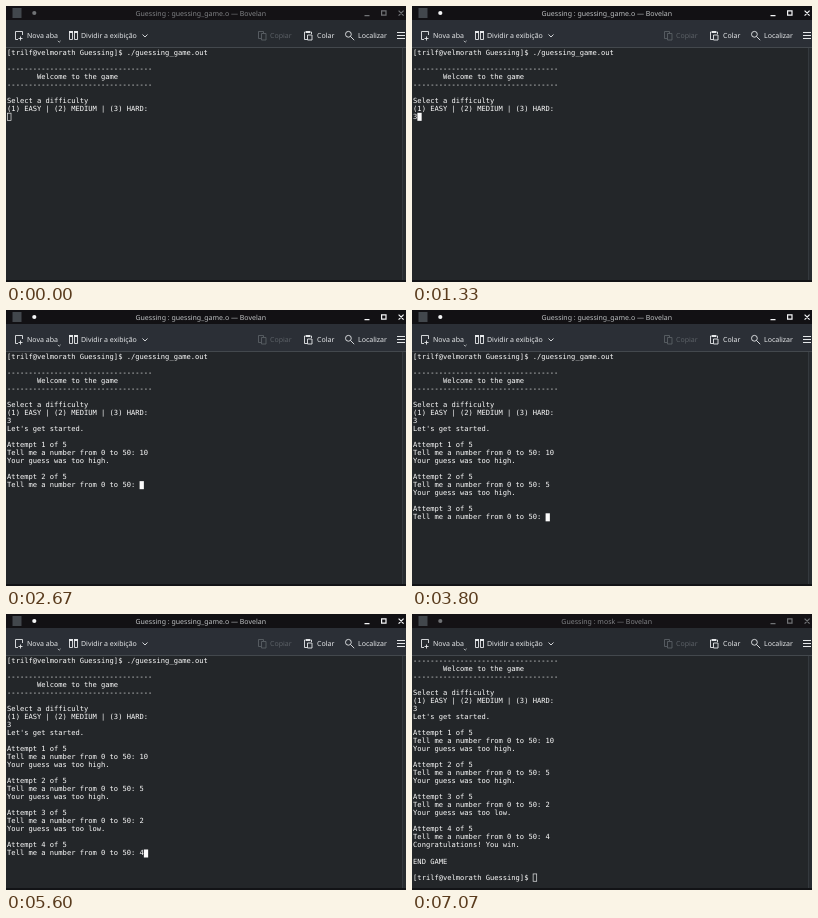
An HTML page with a canvas for the animation above (7.14 s loop, 400 px wide and 276 px high).

```html
<!DOCTYPE html>
<html lang="pt">
<head>
<meta charset="utf-8">
<title>Guessing</title>
<style>
  html, body { margin: 0; width: 100%; height: 100%; overflow: hidden; background: #232629; }
  canvas { display: block; }
</style>
</head>
<body>
<canvas id="stage" width="400" height="276"></canvas>
<script>
const ctx = document.getElementById('stage').getContext('2d');
const LOOP = 7140;
const UI = '7px "Noto Sans", "Open Sans", sans-serif';
const MONO = '7.1px "DejaVu Sans Mono", monospace';
const CELL = 4.274, ROW = 8.04, LEFT = 1.1, TOP = 42.2, ROWS = 28;
const APP = 'Bovelan', PROMPT = '[trilf@velmorath Guessing]$ ';
const RULE = '-'.repeat(34);

const ask = n => `\nAttempt ${n} of 5\nTell me a number from 0 to 50: `;

// Terminal output: [time, text appended]
const output = [
  [0, `${PROMPT}./guessing_game.out\n\n${RULE}\n       Welcome to the game\n${RULE}\n\n` +
      'Select a difficulty\n(1) EASY | (2) MEDIUM | (3) HARD:\n'],
  [1000, '3'],
  [1400, `\nLet's get started.\n${ask(1)}`],
  [2400, '1'],
  [2470, '0'],
  [2670, `\nYour guess was too high.\n${ask(2)}`],
  [3530, '5'],
  [3800, `\nYour guess was too high.\n${ask(3)}`],
  [4530, '2'],
  [4670, `\nYour guess was too low.\n${ask(4)}`],
  [5600, '4'],
  [5730, `\nCongratulations! You win.\n\nEND GAME\n\n${PROMPT}`]
];

const clamp = x => Math.max(0, Math.min(1, x));
const mix = (a, b, k) => `rgb(${a.map((v, i) => Math.round(v + (b[i] - v) * k))})`;

function rect(x, y, w, h, color) {
  ctx.fillStyle = color;
  ctx.fillRect(x, y, w, h);
}

function text(str, x, y, color, font = UI, align = 'left') {
  ctx.font = font;
  ctx.textAlign = align;
  ctx.fillStyle = color;
  ctx.fillText(str, x, y);
}

function stroke(path, color, width = 0.9) {
  ctx.strokeStyle = color;
  ctx.lineWidth = width;
  ctx.stroke(new Path2D(path));
}

function titleBar(t, focus) {
  const ink = mix([112, 114, 117], [245, 246, 247], focus);
  rect(0, 0, 400, 14, mix([20, 18, 21], [18, 17, 20], focus));
  rect(6.5, 2, 9, 10, '#42474c');
  ctx.fillStyle = ink;
  ctx.beginPath();
  ctx.arc(28.3, 7, 2.1, 0, 7);
  ctx.fill();
  const job = t < 5800 ? 'guessing_game.o' : 'mosk';
  text(`Guessing : ${job} — ${APP}`, 194.7, 9.5,
    mix([128, 130, 133], [190, 192, 194], focus), UI, 'center');
  stroke('M358.5 9.6H363.5M375.6 4.8h4.4v4.4h-4.4zM392.6 4.6l5 5m0-5l-5 5', ink, 1.2);
}

function toolBar(focus) {
  const ink = '#e6e8ea', dim = '#5b6066';
  rect(0, 14, 400, 27, mix([39, 43, 48], [43, 47, 54], focus));
  rect(0, 41, 400, 1, '#43484d');

  stroke('M12 33.5H9.5V25.5H16.5V29M14.5 30.5v4m-2-2h4', ink);
  text('Nova aba', 21, 32.2, ink);
  stroke('M51.8 34.8l1.4 1.4l1.4-1.4', ink, 0.7);

  stroke('M63.5 25.5h3v8h-3zM68.5 25.5h3v8h-3z', ink);
  rect(63, 25, 4, 2, ink);
  rect(68, 25, 4, 2, ink);
  text('Dividir a exibição', 75, 32.2, ink);
  stroke('M136.5 28.5l2.5 2.5l2.5-2.5', ink);

  stroke('M255 32.5H252.5V25.5H257.5V27M255.5 27.5h4.5v6.5h-4.5z', dim);
  text('Copiar', 264, 32.2, dim);

  stroke('M301 33.5H298.5V26H305.5V28M301.5 29h4.5v5h-4.5z', ink);
  rect(300, 25, 4, 2, ink);
  text('Colar', 311, 32.2, ink);

  stroke('M345.3 28.3a2.9 2.9 0 1 1-5.8 0a2.9 2.9 0 1 1 5.8 0M344.5 30.5l3.7 3.7', ink);
  text('Localizar', 352, 32.2, ink);
  stroke('M391 26.5h8M391 29.5h8M391 32.5h8', ink, 1);
}

function terminal(t, focused) {
  rect(0, 42, 400, 232, '#232629');
  rect(396, 42, 1, 232, '#34393e');
  rect(397, 42, 3, 232, '#272b2f');
  rect(0, 274, 400, 2, '#121316');

  const lines = output.filter(([at]) => t >= at).map(part => part[1]).join('').split('\n');
  const view = lines.slice(Math.max(0, lines.length - ROWS));
  view.forEach((line, i) => text(line, LEFT, TOP + i * ROW + 6.3, '#fcfcfc', MONO));

  const last = view.length - 1;
  const x = LEFT + view[last].length * CELL;
  const y = TOP + last * ROW + 0.3;
  if (focused) {
    rect(x, y, CELL, ROW, '#fcfcfc');
  } else {
    ctx.strokeStyle = '#e4e5e5';
    ctx.lineWidth = 0.7;
    ctx.strokeRect(x + 0.35, y + 0.35, CELL - 0.7, ROW - 0.7);
  }
}

function draw(now) {
  const t = now % LOOP;
  const focus = clamp((t - 10) / 260) * (1 - clamp((t - 6270) / 260));
  ctx.textRendering = 'geometricPrecision';
  terminal(t, t >= 70 && t < 6330);
  toolBar(focus);
  titleBar(t, focus);
}

const start = performance.now();
function tick() {
  draw(performance.now() - start);
  requestAnimationFrame(tick);
}
tick();
</script>
</body>
</html>
```
